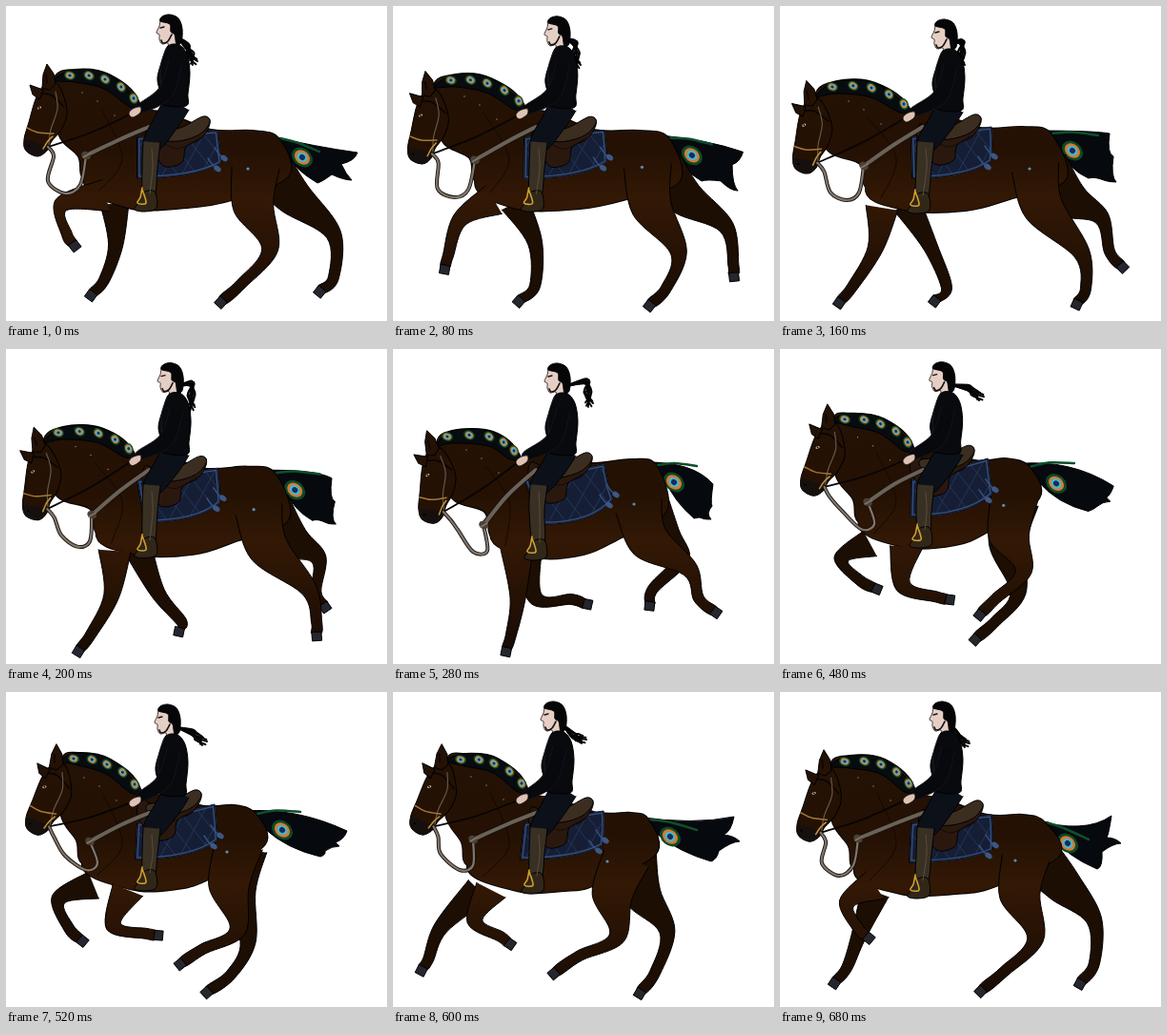
An HTML page with a canvas that plays this animation: 400x331 px, repeating every 0.72 s.

```html
<!DOCTYPE html>
<html>
<head>
<meta charset="utf-8">
<style>
html, body { margin: 0; height: 100%; overflow: hidden; background: #fff; }
canvas { display: block; width: 400px; height: 331px; }
</style>
</head>
<body>
<canvas id="stage" width="400" height="331"></canvas>
<script>
const ctx = document.getElementById('stage').getContext('2d');
const PERIOD = 720, STEP = 40;
const TIMES = [0, 160, 280, 400, 520, 600, 680];

// Each track has one row of x, y pairs per key time.
// Fore legs: elbow, knee, fetlock, toe.
const nearFore = [
  [105,199, 58,209, 64,240, 74,256], [107,212, 100,255, 76,295, 59,315],
  [130,210, 131,262, 124,300, 117,322], [132,208, 155,256, 182,281, 200,294],
  [128,208, 113,246, 148,254, 164,257], [103,208, 86,241, 113,257, 126,268],
  [100,203, 70,222, 82,248, 96,262]];
const farFore = [
  [114,208, 115,252, 103,288, 86,307], [133,208, 158,253, 175,296, 159,313],
  [142,208, 150,262, 187,263, 208,270], [105,210, 93,244, 124,248, 144,246],
  [92,203, 55,218, 66,248, 83,265], [90,208, 50,248, 37,281, 27,296],
  [100,210, 82,258, 70,290, 54,309]];
// Hind legs: hip, stifle, hock, fetlock, toe.
const nearHind = [
  [262,170, 260,212, 277,256, 247,292, 222,314], [268,170, 277,213, 317,260, 321,297, 309,317],
  [258,165, 270,203, 312,232, 321,262, 342,280], [251,150, 257,186, 287,198, 277,248, 278,273],
  [245,160, 234,205, 243,251, 207,270, 179,288], [245,175, 230,215, 235,258, 196,277, 165,298],
  [258,175, 252,215, 268,260, 235,294, 207,317]];
const farHind = [
  [278,172, 303,202, 344,240, 344,285, 326,303], [280,170, 306,205, 338,223, 346,258, 362,278],
  [265,160, 284,200, 303,220, 273,252, 268,274], [245,155, 243,200, 261,233, 228,255, 217,282],
  [250,165, 243,210, 254,263, 236,297, 207,318], [253,175, 263,215, 288,252, 275,295, 256,320],
  [272,175, 299,205, 330,240, 330,285, 312,310]];
// Loin, croup, dock, buttock, flank, belly, girth, chest.
const trunk = [
  [215,130, 258,131, 286,139, 297,178, 240,203, 190,212, 128,212, 82,182],
  [210,128, 255,127, 284,134, 300,182, 241,203, 195,215, 130,214, 90,190],
  [205,120, 250,116, 276,122, 287,170, 236,200, 200,216, 150,219, 102,195],
  [205,115, 240,110, 264,116, 276,155, 226,188, 195,206, 130,212, 90,188],
  [210,120, 240,119, 262,128, 272,160, 216,195, 180,207, 130,207, 80,180],
  [215,127, 250,127, 268,134, 276,170, 212,203, 180,209, 130,209, 78,182],
  [218,129, 255,129, 278,137, 293,172, 224,205, 185,212, 126,212, 78,186]];
// Top, three tips with notches between, underside, feather eye.
const tail = [
  [325,148, 369,154, 352,166, 363,183, 342,177, 327,186, 300,170, 311,159],
  [330,131, 346,134, 350,158, 353,185, 340,183, 324,181, 303,172, 307,152],
  [315,118, 336,142, 335,165, 334,179, 325,178, 316,178, 295,160, 295,140],
  [310,110, 331,133, 334,150, 344,156, 328,165, 310,168, 285,158, 291,136],
  [305,121, 358,146, 346,158, 350,162, 335,167, 330,173, 295,165, 290,145],
  [315,140, 358,131, 347,150, 364,157, 342,167, 334,178, 300,168, 291,152],
  [320,150, 348,130, 343,153, 358,159, 338,168, 333,186, 300,172, 302,159]];
const crest = [
  [72,67, 108,72, 140,102], [60,79, 100,81, 136,108], [62,86, 105,87, 133,112],
  [65,79, 108,81, 137,106], [76,64, 110,71, 141,102], [76,65, 110,70, 141,101],
  [73,67, 110,71, 141,101]];
// Poll position and head angle.
const headTrack = [
  [46,80,0], [33,97,-.12], [42,104,-.19], [45,87,-.09], [54,74,.1], [52,74,.11], [48,80,.05]];
const rope = [
  [84,157, 78,188, 62,197, 44,184], [88,168, 83,196, 70,204, 53,196],
  [95,185, 99,212, 84,213, 68,190], [100,172, 101,196, 84,198, 70,170],
  [88,157, 96,180, 84,187, 62,172], [84,155, 84,182, 70,187, 50,170],
  [82,154, 77,182, 62,193, 44,180]];
// Blanket corners: upper right, lower right, lower left.
const blanketTrack = [
  [222,131, 226,165, 138,181], [222,127, 222,163, 139,181], [222,121, 231,158, 158,184],
  [218,112, 225,148, 142,178], [219,118, 222,156, 136,176], [221,125, 220,161, 134,176],
  [222,129, 223,166, 136,179]];
const saddleShift = [[0,0], [-3,-2], [-5,-7], [-10,-14], [-9,-13], [-4,-5], [-1,-2]];
const riderShift = [[0,0], [1,5], [1,6], [0,5], [-2,4], [-3,1], [-1,1]];
const ankleTrack = [[150,203], [149,205], [153,209], [154,199], [150,196], [150,199], [149,204]];
const ponytail = [
  [190,42, 197,58], [191,38, 190,62], [203,34, 206,57], [200,38, 213,46],
  [195,42, 207,52], [190,46, 199,50], [186,46, 195,54]];
const spark = [[254,171], [262,171], [253,163], [240,160], [232,168], [225,178], [247,177]];

// Cubic interpolation through the key rows, wrapping around the loop.
function pose(rows, t) {
  const n = TIMES.length;
  const time = k => TIMES[(k + n) % n] + PERIOD * Math.floor(k / n);
  const row = k => rows[(k + n) % n];
  const i = TIMES.filter(k => k <= t).length - 1;
  const span = time(i + 1) - time(i), u = (t - time(i)) / span;
  const slope = (k, j) => {
    const a = time(k) - time(k - 1), b = time(k + 1) - time(k);
    return ((row(k)[j] - row(k - 1)[j]) / a * b + (row(k + 1)[j] - row(k)[j]) / b * a) / (a + b);
  };
  return row(i).map((p, j) => {
    const q = row(i + 1)[j];
    return p + (q - p) * u * u * (3 - 2 * u)
      + span * u * (1 - u) * ((1 - u) * slope(i, j) - u * slope(i + 1, j));
  });
}

function pairs(flat) {
  const out = [];
  for (let i = 0; i < flat.length; i += 2) out.push([flat[i], flat[i + 1]]);
  return out;
}

// Smooth path through points.
function curve(pts, closed) {
  const n = pts.length;
  const at = i => closed ? pts[(i + n) % n] : pts[Math.max(0, Math.min(n - 1, i))];
  const path = new Path2D();
  path.moveTo(...pts[0]);
  for (let i = 0; i < n - !closed; i++) {
    const [a, b, c, d] = [at(i - 1), at(i), at(i + 1), at(i + 2)];
    path.bezierCurveTo(b[0] + (c[0] - a[0]) / 6, b[1] + (c[1] - a[1]) / 6,
      c[0] - (d[0] - b[0]) / 6, c[1] - (d[1] - b[1]) / 6, ...c);
  }
  return path;
}

function poly(pts) {
  const path = new Path2D();
  pts.forEach(p => path.lineTo(...p));
  path.closePath();
  return path;
}

function paint(path, fill, stroke = '#000', width = 1) {
  ctx.fillStyle = fill;
  ctx.fill(path);
  if (stroke) line(path, stroke, width);
}

function line(path, color, width = 1) {
  ctx.strokeStyle = color;
  ctx.lineWidth = width;
  ctx.stroke(path);
}

function dot(x, y, r, color, ry = r, angle = 0) {
  ctx.fillStyle = color;
  ctx.beginPath();
  ctx.ellipse(x, y, r, ry, angle, 0, 7);
  ctx.fill();
}

const blob = flat => curve(pairs(flat), true);
const thread = flat => curve(pairs(flat), false);

// Outline of a tapering limb around its joints, open at the top.
function limb(joints, widths) {
  const left = [], right = [];
  joints.forEach(([x, y], i) => {
    const a = joints[Math.max(0, i - 1)], b = joints[Math.min(joints.length - 1, i + 1)];
    const dx = b[0] - a[0], dy = b[1] - a[1], s = widths[i] / Math.hypot(dx, dy);
    left.push([x - dy * s, y + dx * s]);
    right.unshift([x + dy * s, y - dx * s]);
  });
  return curve([...left, ...right], false);
}

function leg(track, t, widths, coat) {
  const joints = pairs(pose(track, t));
  const toe = joints.pop(), [fx, fy] = joints[joints.length - 1];
  const len = Math.hypot(toe[0] - fx, toe[1] - fy);
  const ux = (toe[0] - fx) / len, uy = (toe[1] - fy) / len;
  const spot = (back, side) => [toe[0] - ux * back - uy * side, toe[1] - uy * back + ux * side];
  paint(limb([...joints, spot(7, 0)], widths), coat);
  paint(poly([spot(9, -5), spot(0, -6), spot(-1, 4), spot(8, 5)]), '#25262e');
}

function feather(x, y, r, angle) {
  dot(x, y, r * 1.5, '#0b4a27', r * 1.15, angle);
  dot(x, y, r * 1.1, '#d8792c', r * .85, angle);
  dot(x, y, r * .75, '#4db4cf', r * .6, angle);
  dot(x, y, r * .4, '#10305e', r * .35, angle);
}

function drawTail(t, dock) {
  const [top, a, n1, b, n2, c, under, eye] = pairs(pose(tail, t));
  const [x, y] = dock, path = new Path2D();
  path.moveTo(x - 12, y - 3);
  path.quadraticCurveTo(...top, ...a);
  path.quadraticCurveTo(a[0] - 3, n1[1] - 3, ...n1);
  path.quadraticCurveTo(b[0] - 6, b[1] - 6, ...b);
  path.quadraticCurveTo(b[0] - 8, b[1], ...n2);
  path.quadraticCurveTo(c[0] + 6, c[1] - 2, ...c);
  path.quadraticCurveTo(...under, x + 10, y + 16);
  path.closePath();
  paint(path, '#06090e');
  line(thread([x + 2, y, (x + top[0]) / 2, (y + top[1]) / 2, top[0] + 4, top[1] + 5]), '#0d4f2b', 2.5);
  feather(...eye, 8, .7);
}

function drawHead(coat) {
  paint(blob([39,84, 31,98, 24,122, 19,140, 21,152, 33,158, 43,152, 48,142, 58,130, 64,112, 58,88, 48,78]), coat);
  paint(blob([20,141, 20,151, 33,158, 43,152, 44,147, 33,144]), '#15100e', null);
  paint(poly([[39,88], [25,83], [28,93], [35,98]]), coat);
  paint(poly([[38,86], [39,72], [43,61], [50,71], [52,82], [46,88]]), coat);
  line(thread([42,72, 43,80]), '#120804', 2);
  line(thread([37,92, 48,94, 61,106]), '#090504', 1.6);
  line(thread([52,90, 54,108, 47,130, 45,146]), '#64584b', 1.2);
  line(thread([22,128, 34,133, 50,134]), '#a37a35', 1.5);
  line(thread([39,150, 44,142, 49,137]), '#c3953e', 1.5);
  dot(35, 107, 2.2, '#d5b9a0', 1.2, -.4);
  dot(35, 107, .9, '#000');
  dot(24, 147, 1.2, '#000');
}

function drawBlanket(t) {
  const [ur, lr, ll] = pairs(pose(blanketTrack, t));
  const low = [(lr[0] + ll[0]) / 2 + 2, Math.max(lr[1], ll[1]) - 2];
  const path = new Path2D();
  path.moveTo(138, 138);
  path.lineTo(...ur);
  path.quadraticCurveTo(ur[0] + 2, (ur[1] + lr[1]) / 2, ...lr);
  path.quadraticCurveTo(low[0] + 14, low[1] + 2, ...ll);
  path.closePath();
  paint(path, '#151e35');
  ctx.save();
  ctx.clip(path);
  for (let x = -40; x < 120; x += 20) {
    line(thread([ll[0] + x, ll[1] + 8, ll[0] + x + 36, ll[1] - 58]), '#293c60', .8);
    line(thread([ll[0] + x, ll[1] - 58, ll[0] + x + 52, ll[1] + 8]), '#293c60', .8);
  }
  line(path, '#36517f', 5);
  line(path, '#151e35', 2.5);
  ctx.restore();
  [[-2, -9], [-9, 2]].forEach(([dx, dy]) => {
    const x = lr[0] + dx, y = lr[1] + dy;
    line(thread([x - 5, y - 7, x, y, x + 5, y + 4]), '#35517e', 1.5);
    dot(x + 5, y + 4, 4, '#3b5787', 2.8, .6);
  });
}

function drawSaddle(t) {
  ctx.save();
  ctx.translate(...pose(saddleShift, t));
  paint(blob([150,126, 164,131, 185,130, 209,117, 214,124, 205,139, 189,148, 185,164, 168,169, 157,158, 147,143]), '#2a180f');
  paint(blob([158,131, 183,128, 207,116, 214,122, 203,135, 181,142, 160,140]), '#3b2e21');
  line(thread([163,142, 181,150, 204,138]), '#120b07');
  ctx.restore();
}

function drawRider(t) {
  const [dx, dy] = pose(riderShift, t), [ax, ay] = pose(ankleTrack, t);
  paint(limb([[180, 102 + dy / 2], [168, 122 + dy / 2], [152, 147]], [14, 13, 9]), '#0c1019');
  paint(limb([[153, 143], [151, 170], [ax, ay - 4]], [9, 8, 6]), '#393024');
  paint(blob([ax - 6, ay - 7, ax + 6, ay - 8, ax + 8, ay + 9, ax - 4, ay + 13, ax - 15, ay + 11, ax - 12, ay + 5]), '#302719');
  line(thread([153,150, 154,170, ax + 1, ay - 6]), '#5b4d39');
  line(thread([ax - 7, ay - 12, ax - 9, ay - 2, ax - 12, ay + 4, ax - 3, ay + 4, ax - 7, ay - 10]), '#d3a02c', 1.6);

  ctx.save();
  ctx.translate(dx, dy);
  const [mx, my, tx, ty] = pose(ponytail, t);
  for (let i = 0; i < 7; i++) {
    const a = i * 2.4, sx = 4 * Math.cos(a), sy = 4 * Math.sin(a);
    line(thread([181, 33, mx - dx + sx * .7, my - dy + sy * .7,
      (mx + tx) / 2 - dx - sx, (my + ty) / 2 - dy + sy, tx - dx + sx, ty - dy + sy]), '#050507', 2);
  }
  paint(blob([163,14, 161,21, 158,28, 161,30, 161,35, 164,40, 170,39, 171,46, 181,46, 180,22, 172,13]), '#e5cfc4', '#1a1010', .8);
  paint(blob([162,16, 164,11, 172,9, 181,13, 185,24, 184,38, 179,40, 177,30, 173,27, 172,19]), '#060609');
  line(thread([163,36, 165,39, 170,37, 174,30]), '#17100f', 1.6);
  line(thread([162,23, 166,22]), '#17100f', 1.3);
  paint(blob([170,42, 182,41, 190,51, 193,70, 191,92, 189,105, 163,103, 161,88, 159,75, 164,57]), '#090a0e');
  line(thread([168,45, 162,65, 164,98]), '#20232c', .8);
  ctx.restore();
  paint(limb([[178 + dx, 58 + dy], [167 + dx, 91 + dy * .8], [139, 109 + dy * .6]], [7, 8, 4.5]), '#08090d', '#15171d', .8);
  paint(blob([141, 106 + dy, 133, 108 + dy, 129, 113 + dy, 133, 117 + dy, 141, 112 + dy]), '#dfc4b5', '#1a1010', .8);
}

function draw(t) {
  ctx.clearRect(0, 0, 400, 331);
  ctx.lineJoin = ctx.lineCap = 'round';
  const coat = ctx.createLinearGradient(0, 60, 0, 320);
  coat.addColorStop(0, '#241206');
  coat.addColorStop(.35, '#241103');
  coat.addColorStop(.55, '#331805');
  coat.addColorStop(1, '#170b03');

  const body = pairs(pose(trunk, t)), chest = body[7];
  const [px, py, angle] = pose(headTrack, t);
  const onHead = (x, y) => [
    px + (x - 46) * Math.cos(angle) - (y - 80) * Math.sin(angle),
    py + (x - 46) * Math.sin(angle) + (y - 80) * Math.cos(angle)];
  const [m1, m2, withers] = pairs(pose(crest, t));
  const poll = [px + 4, py - 2], bit = onHead(44, 148);

  drawTail(t, body[2]);
  leg(farHind, t, [24, 19, 8, 5.5, 5], '#1d0e04');
  leg(farFore, t, [15, 7.5, 5.5, 4.5], '#1d0e04');

  const torso = curve([[142, 112], ...body], true);
  const neck = curve([poll, m1, m2, withers, [140, 165], [118, 195], chest,
    [chest[0] - 6, chest[1] - 24], onHead(55, 134)], true);
  line(torso, '#000', 2);
  line(neck, '#000', 2);
  paint(torso, coat, null);
  paint(neck, coat, null);
  leg(nearHind, t, [25, 21, 8.5, 5.5, 5], coat);
  leg(nearFore, t, [17, 8, 5.5, 4.5], coat);
  line(thread([m2[0] - 8, m2[1] + 36, 122, 160, chest[0] + 16, chest[1] + 12]), '#130802');

  // Mane with feather eyes spaced along the crest.
  const low = ([x, y], dx, dy) => [x + dx, y + dy];
  paint(curve([poll, m1, m2, withers, low(withers, -10, 4), low(m2, -5, 15), low(m1, 0, 13)], true), '#070c10');
  const between = (a, b, u) => [a[0] + (b[0] - a[0]) * u, a[1] + (b[1] - a[1]) * u];
  [low(m1, -5, 6), low(between(m1, m2, .42), 0, 4), low(m2, -4, 5),
    low(between(m2, withers, .4), 0, 1), low(withers, -6, -5)]
    .forEach(([x, y], i) => feather(x, y, 4.1, .3 + i * .22));

  ctx.save();
  ctx.translate(px, py);
  ctx.rotate(angle);
  ctx.translate(-46, -80);
  drawHead(coat);
  ctx.restore();

  drawBlanket(t);
  drawSaddle(t);
  const hand = [134, 112 + pose(riderShift, t)[1] * .8];
  line(curve([bit, [(bit[0] + hand[0]) / 2, (bit[1] + hand[1]) / 2 + 3], hand], false), '#080504', 1.8);

  const loop = pairs(pose(rope, t)), [kx, ky] = loop[0];
  const strap = curve([[150, 127], [120, (ky + 117) / 2 + 3], loop[0]], false);
  const slack = curve([...loop, onHead(50, 158), bit], false);
  line(slack, '#17110d', 4);
  line(slack, '#81766c', 2.2);
  line(strap, '#17110d', 6);
  line(strap, '#6b6156', 4);
  dot(kx, ky, 5, '#4a4138', 4, .5);
  line(thread([kx - 3, ky + 2, kx + 4, ky - 2]), '#82776a', 1.5);

  drawRider(t);
  const [sx, sy] = pose(spark, t);
  dot(sx, sy, 1.6, '#5790b5');
  [[-12, 28], [-28, 19], [6, 43]].forEach(([x, y]) => dot(m2[0] + x, m2[1] + y, .7, '#93877c'));
}

function tick() {
  draw(Math.floor(performance.now() / STEP) * STEP % PERIOD);
  requestAnimationFrame(tick);
}
tick();
</script>
</body>
</html>
```
